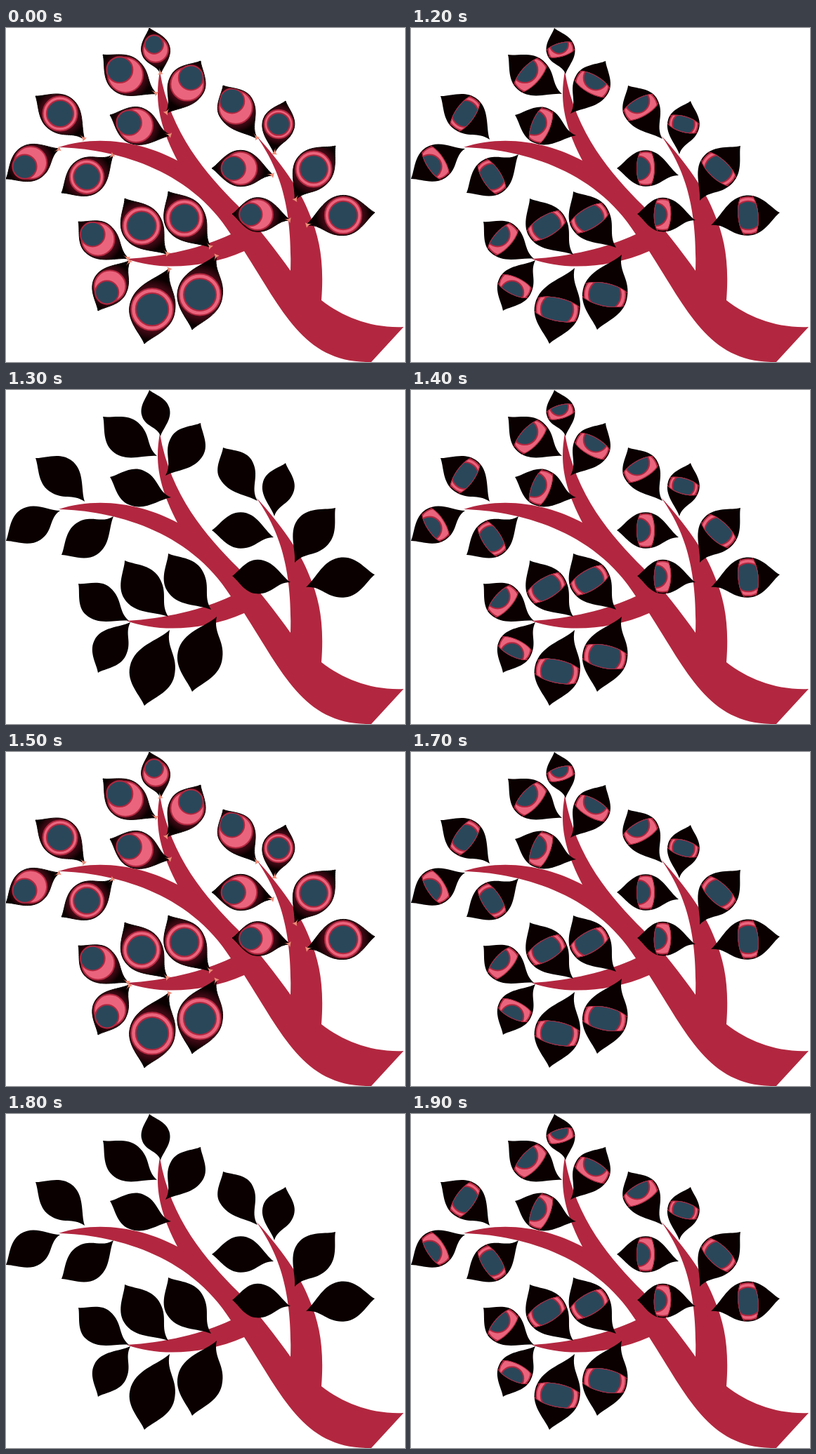
Write an HTML page with a canvas that moves like this. It is 568 px wide and 476 px high and loops after 2 s.

```html
<!DOCTYPE html>
<html lang="en">
<head>
<meta charset="utf-8">
<title>Blinking branch</title>
<style>
html, body { margin: 0; height: 100%; overflow: hidden; background: #fff; }
canvas { display: block; }
</style>
</head>
<body>
<canvas id="stage" width="568" height="476"></canvas>
<script>
const ctx = document.getElementById('stage').getContext('2d');
const RED = '#b2273f', PINK = '#eb647d', IRIS = '#2a475a', BLACK = '#0a0000', SALMON = '#f08d78';
const LOOP = 2000;

// Each leaf: tip, stem end, eye centre. These look straight ahead.
const ahead = [
  [42, 97, 112, 159, 77, 122],
  [79, 235, 153, 180, 115, 212],
  [398, 104, 382, 180, 388, 137],
  [469, 168, 411, 246, 438, 201],
  [525, 263, 427, 281, 480, 267],
  [169, 243, 231, 323, 193, 282],
  [231, 233, 292, 313, 254, 271],
  [197, 450, 233, 342, 208, 401],
  [265, 430, 300, 323, 276, 380]
];

function makeLeaf([tx, ty, sx, sy, x, y], gaze, irisSize) {
  const reach = Math.hypot(tx - x, ty - y), tail = Math.hypot(sx - x, sy - y);
  const ux = (tx - x) / reach, uy = (ty - y) / reach;
  const bend = Math.sign((sy - y) * ux - (sx - x) * uy) || 1;
  const r = Math.hypot(tx - sx, ty - sy) * .262;
  const w = r + 2.5;

  // The side towards the bent stem is hollow, the other nearly straight.
  const side = s => {
    const ax = x - uy * w * s, ay = y + ux * w * s;
    return {
      a: [ax, ay],
      tip: [tx + (ax - tx) * .25, ty + (ay - ty) * .25],
      front: [ax + ux * reach * .48, ay + uy * reach * .48],
      back: [ax - ux * tail * .48, ay - uy * tail * .48],
      stem: s === bend
        ? [sx + ux * tail * .42, sy + uy * tail * .42]
        : [sx + (ax - sx) * .3, sy + (ay - sy) * .3]
    };
  };
  const p = side(1), q = side(-1), shape = new Path2D();
  shape.moveTo(tx, ty);
  shape.bezierCurveTo(...p.tip, ...p.front, ...p.a);
  shape.bezierCurveTo(...p.back, ...p.stem, sx, sy);
  shape.bezierCurveTo(...q.stem, ...q.back, ...q.a);
  shape.bezierCurveTo(...q.front, ...q.tip, tx, ty);
  shape.closePath();

  const lids = new Path2D();
  lids.ellipse(x, y, r * .56, r * 1.3, Math.atan2(uy, ux), 0, 7);

  const glow = ctx.createRadialGradient(x, y, r, x, y, r * 1.5);
  glow.addColorStop(0, '#4a0b18');
  glow.addColorStop(1, BLACK);
  return {
    shape, lids, glow, x, y, r, sx, sy,
    ix: x + ux * r * gaze, iy: y + uy * r * gaze, ir: r * irisSize,
    dx: (x - sx) / tail, dy: (y - sy) / tail
  };
}

function disc(x, y, r, fill) {
  ctx.beginPath();
  ctx.arc(x, y, r, 0, 7);
  ctx.fillStyle = fill;
  ctx.fill();
  ctx.strokeStyle = RED;
  ctx.lineWidth = 2;
  ctx.stroke();
}

function drawStem({ sx, sy, dx, dy }) {
  ctx.beginPath();
  ctx.moveTo(sx - dy * 4, sy + dx * 4);
  ctx.quadraticCurveTo(sx + dx * 3, sy + dy * 3, sx + dx * 10, sy + dy * 10);
  ctx.quadraticCurveTo(sx + dx * 3, sy + dy * 3, sx + dy * 4, sy - dx * 4);
  ctx.closePath();
  ctx.fillStyle = SALMON;
  ctx.fill();
}

function drawLeaf(leaf, open) {
  ctx.fillStyle = open === 1 ? leaf.glow : BLACK;
  ctx.fill(leaf.shape);
  if (open) {
    ctx.save();
    ctx.clip(leaf.shape);
    if (open < 1) ctx.clip(leaf.lids);
    disc(leaf.x, leaf.y, leaf.r, PINK);
    disc(leaf.ix, leaf.iy, leaf.ir, IRIS);
    if (open < 1) ctx.stroke(leaf.lids);
    ctx.restore();
  }
  if (open === 1) {
    ctx.strokeStyle = BLACK;
    ctx.lineWidth = 1;
    ctx.stroke(leaf.shape);
    drawStem(leaf);
  }
}

// These look towards the leaf tip.
const outward = [
  [204, 0, 220, 66, 213, 31],
  [138, 38, 215, 94, 170, 67],
  [277, 47, 227, 122, 258, 80],
  [148, 124, 235, 153, 185, 139],
  [0, 215, 77, 172, 35, 192],
  [309, 82, 358, 158, 327, 113],
  [293, 200, 381, 210, 334, 200],
  [322, 265, 405, 274, 358, 266],
  [103, 276, 175, 329, 131, 301],
  [131, 403, 177, 331, 148, 368]
];

const leaves = [
  ...ahead.map(p => makeLeaf(p, 0, .78)),
  ...outward.map(p => makeLeaf(p, .44, .74))
];

// Each blink is half, shut, half, in steps of 100 ms.
function openness(t) {
  const start = t < 1500 ? 1200 : 1700;
  return [.5, 0, .5][Math.floor((t - start) / 100)] ?? 1;
}

const branch = new Path2D(`M566 426 C520 428 480 412 449 388 C453 335 447 300 432 265
  C420 232 390 190 356 153 C385 195 408 245 405 346 C385 318 360 285 330 253
  C285 208 234 150 219 62 C212 100 216 135 244 189 C200 165 135 150 75 170
  C150 172 260 198 320 294 C280 313 225 326 172 329 C215 345 280 344 339 318
  C395 405 425 478 520 476 Z`);

function frame() {
  const open = openness(performance.now() % LOOP);
  ctx.clearRect(0, 0, 568, 476);
  ctx.fillStyle = RED;
  ctx.fill(branch);
  leaves.forEach(leaf => drawLeaf(leaf, open));
  requestAnimationFrame(frame);
}
frame();
</script>
</body>
</html>
```
